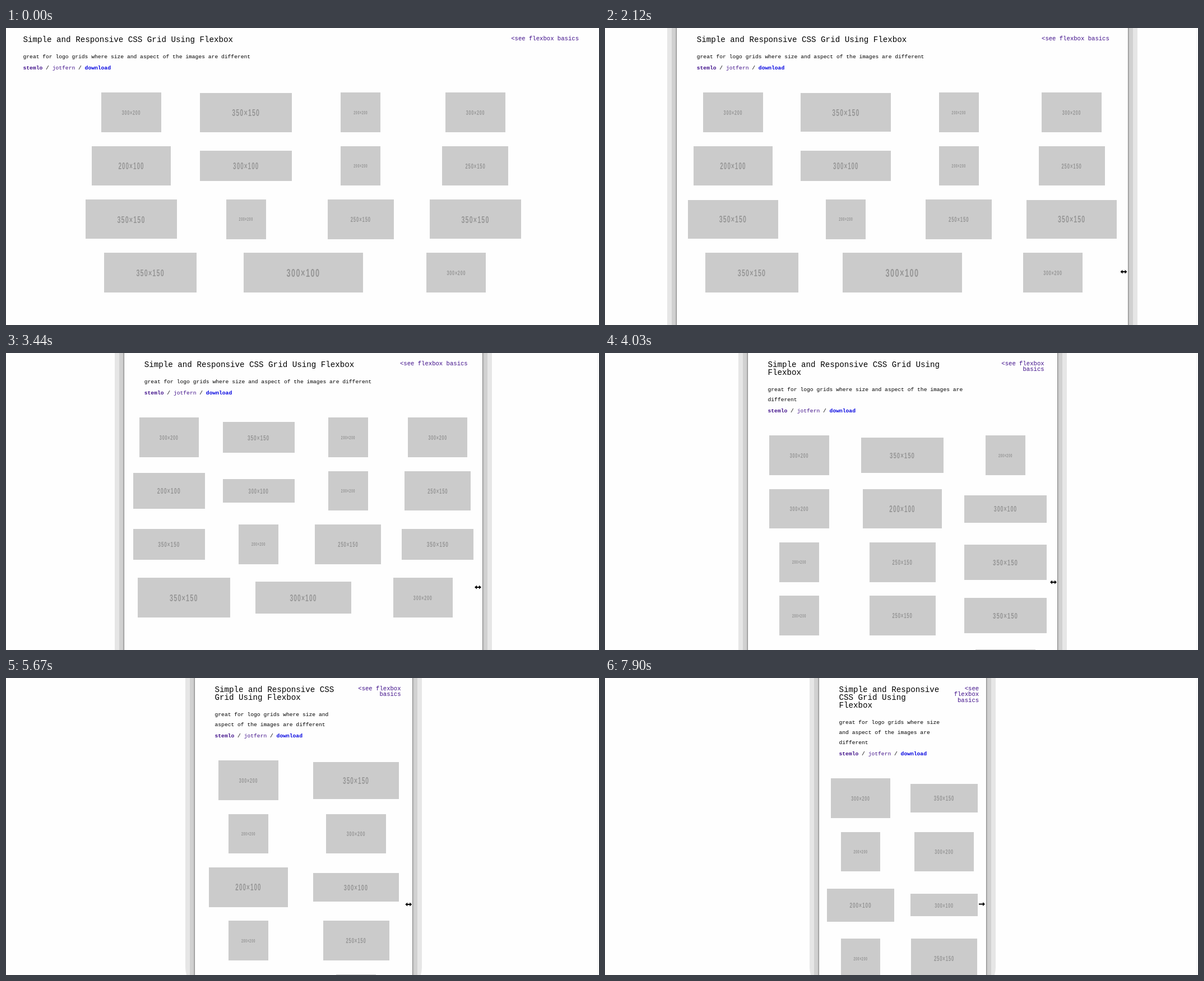
An HTML page with a canvas for the animation above (8000 ms loop, 1058 by 530 pixels).

```html
<!DOCTYPE html>
<html lang="en">
<head>
<meta charset="utf-8">
<title>Responsive grid</title>
<style>
html, body { margin: 0; width: 100%; height: 100%; overflow: hidden; background: #fefefe; }
canvas { display: block; }
</style>
</head>
<body>
<canvas id="stage" width="1058" height="530"></canvas>
<script>
const ctx = document.getElementById('stage').getContext('2d');
const WIDTH = 1058, HEIGHT = 530, LOOP = 8000, TICK = 148;
const MONO = '"Liberation Mono", "DejaVu Sans Mono", monospace';
const SANS = '"Liberation Sans", Arial, sans-serif';
const VISITED = '#40108a';
const TITLE_LINE = 14, NOTE_LINE = 18, BACK_LINE = 10.4;
const CONDENSE = .62;

// time, left page edge, cursor x, cursor y, layout lag
const KEYS = [
  [0, -5.5, 1100, 455, 0],
  [500, 0, 1055, 455, 0],
  [1380, 69, 986, 446, 0],
  [1520, 80, 975, 444, 0],
  [2700, 175.5, 876, 426, 0],
  [3890, 246, 808, 410, 0],
  [4030, 254.5, 800, 409, 0],
  [5070, 310, 742, 404.5, 8],
  [6260, 363, 694.5, 403.5, 0],
  [6410, 367.5, 691, 403.5, 0],
  [7300, 381.5, 672, 403.5, 0]
];

const ITEMS = ('300×200 350×150 200×200 300×200 200×100 300×100 200×200 250×150 ' +
  '350×150 200×200 250×150 350×150 350×150 300×100 300×200').split(' ');

// label width as a share of the image width
const LABEL = { '300×200': .316, '350×150': .305, '200×200': .355,
  '200×100': .326, '300×100': .281, '250×150': .306 };

function stateAt(t) {
  let i = KEYS.length - 1;
  while (KEYS[i][0] > t) i--;
  const a = KEYS[i], b = KEYS[i + 1];
  if (!b) return a;
  const span = b[0] - a[0];
  const steps = i ? Math.round(span / TICK) : 1;
  const u = Math.floor(steps * (t - a[0]) / span + 1e-6) / steps;
  return a.map((v, k) => v + (b[k] - v) * u);
}

function rect(color, x, y, w, h) {
  ctx.fillStyle = color;
  ctx.fillRect(x, y, w, h);
}

// Snaps each edge to a whole pixel.
function snapRect(color, x, y, w, h) {
  const left = Math.round(x), top = Math.round(y);
  rect(color, left, top, Math.round(x + w) - left, Math.round(y + h) - top);
}

function text(str, x, y, font, color, align = 'left') {
  ctx.font = font;
  ctx.fillStyle = color;
  ctx.textAlign = align;
  ctx.fillText(str, x, y);
}

function wrap(str, font, max) {
  ctx.font = font;
  const lines = [];
  let line = '';
  for (const word of str.split(' ')) {
    const next = line ? line + ' ' + word : word;
    if (line && ctx.measureText(next).width > max) {
      lines.push(line);
      line = word;
    } else line = next;
  }
  return [...lines, line];
}

function drawFrame(edge, width) {
  const left = Math.round(edge), w = Math.round(edge + width) - left;
  const bottom = width < 470 ? 566 : 640;
  ctx.fillStyle = '#e6e6e6';
  ctx.beginPath();
  ctx.roundRect(left - 17, -100, w + 34, bottom + 100, 50);
  ctx.fill();
  rect('#d1d1d1', left - 9, 0, w + 18, HEIGHT);
  rect('#c3c3c3', left - 3, 0, w + 6, HEIGHT);
  rect('#858585', left - 1, 0, w + 2, HEIGHT);
  rect('#fefefe', left, 0, w, HEIGHT);
}

// Returns how far the header pushes the grid down.
function drawHeader(left, width) {
  const x = left + 36, box = .66 * width - 14;
  const big = '14.2px ' + MONO, small = '9.67px ' + MONO, mid = '10.6px ' + MONO;
  const title = wrap('Simple and Responsive CSS Grid Using Flexbox', big, box);
  const note = wrap('great for logo grids where size and aspect of the images are different', small, box);
  const back = wrap('<see flexbox basics', mid, .2 * width);

  const titlePush = (title.length - 1) * TITLE_LINE;
  const push = titlePush + (note.length - 1) * NOTE_LINE;
  title.forEach((s, i) => text(s, x, 25 + i * TITLE_LINE, big, '#000'));
  note.forEach((s, i) => text(s, x, 54 + titlePush + i * NOTE_LINE, small, '#000'));
  back.forEach((s, i) => text(s, left + width * .9585, 22 + i * BACK_LINE, mid, VISITED, 'right'));

  let lx = x;
  for (const [s, color, weight] of [['stemlo', VISITED, 'bold '], [' / ', '#000', ''],
    ['jotfern', VISITED, ''], [' / ', '#000', ''], ['download', '#0000e0', 'bold ']]) {
    text(s, lx, 74 + push, weight + small, color);
    lx += ctx.measureText(s).width;
  }
  return push;
}

function drawImage(name, cx, cy, maxW) {
  const [w, h] = name.split('×').map(Number);
  const scale = Math.min(maxW / w, 70.8 / h);
  const iw = w * scale, ih = h * scale;
  snapRect('#cbcbcb', cx - iw / 2, cy - ih / 2, iw, ih);
  const size = iw * LABEL[name] / 2.9;
  ctx.save();
  ctx.translate(cx, cy + size * .36);
  ctx.scale(CONDENSE, 1);
  ctx.letterSpacing = size * .11 + 'px';
  text(name, 0, 0, 'bold ' + size + 'px ' + SANS, '#969696', 'center');
  ctx.restore();
}

function drawGrid(left, width, push) {
  const total = Math.min(818.6, width);
  const cols = Math.min(4, Math.floor(width / 141));
  const start = left + (width - total) / 2;
  for (let i = 0, y = 150.75 + push; i < ITEMS.length; i += cols, y += 95.3) {
    const row = ITEMS.slice(i, i + cols), cell = total / row.length;
    row.forEach((name, k) => drawImage(name, start + cell * (k + .5), y, cell * .8));
  }
}

function drawCursor(x, y, single) {
  ctx.save();
  ctx.translate(x, y);
  ctx.beginPath();
  ctx.moveTo(6, 0);
  ctx.lineTo(2, -3.5);
  ctx.lineTo(2, -1);
  if (single) {
    ctx.lineTo(-5, -1);
    ctx.lineTo(-5, 1);
  } else {
    ctx.lineTo(-2, -1);
    ctx.lineTo(-2, -3.5);
    ctx.lineTo(-6, 0);
    ctx.lineTo(-2, 3.5);
    ctx.lineTo(-2, 1);
  }
  ctx.lineTo(2, 1);
  ctx.lineTo(2, 3.5);
  ctx.closePath();
  ctx.strokeStyle = '#fff';
  ctx.lineWidth = 1.5;
  ctx.stroke();
  ctx.fillStyle = '#000';
  ctx.fill();
  ctx.restore();
}

function draw(t) {
  const [, left, cx, cy, lag] = stateAt(t);
  const width = 1061 - 2 * left;
  rect('#fefefe', 0, 0, WIDTH, HEIGHT);
  if (t >= 500) rect('#f3f3f3', 1055, 0, 1, HEIGHT);
  drawFrame(left, width);
  const push = drawHeader(left, width - lag);
  drawGrid(left, width - lag, push);
  if (t >= 500) drawCursor(cx, cy, t >= 7900);
}

const begin = performance.now();
function tick(now) {
  draw(Math.max(0, now - begin) % LOOP);
  requestAnimationFrame(tick);
}
draw(0);
requestAnimationFrame(tick);
</script>
</body>
</html>
```
